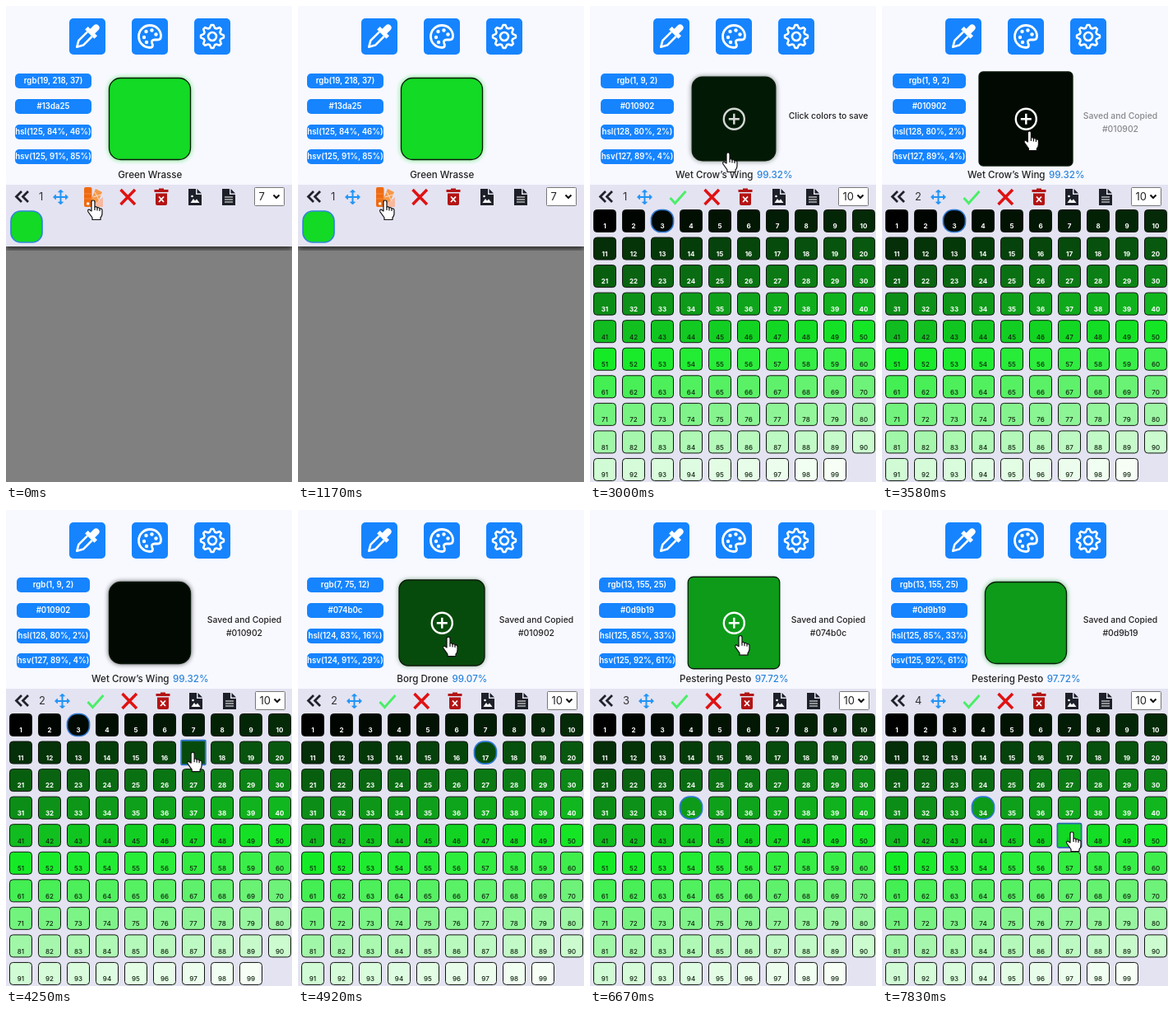
Write an HTML page that moves like this. It is 348 by 578 pixels and loops after 8 s.

```html
<!DOCTYPE html>
<html lang="en">
<head>
<meta charset="utf-8">
<title>Color picker</title>
<style>
html, body { margin: 0; width: 100%; height: 100%; overflow: hidden; background: #f8f9ff; }
svg { display: block; font-family: Inter, "Open Sans", sans-serif; }
</style>
</head>
<body>
<svg id="stage" width="348" height="578" viewBox="0 0 348 578">
  <defs>
    <filter id="soft" x="-20%" y="-20%" width="140%" height="140%"><feGaussianBlur stdDeviation="3"/></filter>
  </defs>
  <rect width="348" height="578" fill="#f8f9ff"/>

  <g fill="#1684ff">
    <rect x="77" y="15" width="44" height="44" rx="5"/>
    <rect x="153" y="15" width="44" height="44" rx="5"/>
    <rect x="229" y="15" width="44" height="44" rx="5"/>
  </g>
  <g transform="translate(99 37) rotate(45)" fill="#fff">
    <path d="M-4-9V-15Q-4-19 0-19T4-15V-9H8V-4H-8V-9Z"/>
    <path d="M-4-4V11L0 18L4 11V-4" fill="none" stroke="#fff" stroke-width="2.6" stroke-linejoin="round"/>
  </g>
  <g transform="translate(175 37)" fill="#fff">
    <path d="M0-13.5A13.5 13.5 0 0 0 0 13.5C4 13.5 4 10.5 2.8 8.5C1.5 5.5 3 4 6 4H9.5C12.5 4 13.5 2 13.5-.5C13.5-8 7.5-13.5 0-13.5Z" fill="none" stroke="#fff" stroke-width="2.8"/>
    <circle cx="-7" cy="1" r="2.2"/><circle cx="-4.5" cy="-6" r="2.2"/>
    <circle cx="2.5" cy="-7.5" r="2.2"/><circle cx="7.5" cy="-2.5" r="2.2"/>
    <circle cx="-4" cy="7" r="2.2"/>
  </g>
  <g transform="translate(251 37)" fill="none" stroke="#fff" stroke-width="2.6" stroke-linejoin="round">
    <path id="gear"/><circle r="5"/>
  </g>

  <g id="pills"></g>

  <rect id="glow" filter="url(#soft)"/>
  <rect id="swatch" stroke="#0c1a0c" stroke-width="1.3"/>
  <g id="plus" transform="translate(175.3 137.3)" fill="none" stroke="#fff" stroke-width="2.4">
    <circle r="12.5"/><path d="M-6.5 0H6.5M0-6.5V6.5"/>
  </g>
  <text id="name" x="175.3" y="209" font-size="11.6" font-weight="500" fill="#222" text-anchor="middle"><tspan></tspan><tspan dx="4.5" fill="#2a84dc"></tspan></text>
  <g id="message" font-size="10.4" font-weight="500" fill="#222" text-anchor="middle">
    <text x="290" y="137"></text><text x="290" y="153"></text>
  </g>

  <g id="saved">
    <rect y="292" width="348" height="286" fill="#808080"/>
    <rect y="287" width="348" height="8" fill="#222" filter="url(#soft)"/>
  </g>
  <rect id="panel" y="217" width="348" fill="#e4e3f2"/>
  <rect id="savedColor" x="6" y="249" width="38" height="38" rx="12" fill="#13da25" stroke="#2f86d8" stroke-width="1.7"/>

  <path d="M19 225L12.5 231.5L19 238M27 225L20.500 231.500L27 238" fill="none" stroke="#20222a" stroke-width="2.8"/>
  <text id="count" x="40" y="236" font-size="13" fill="#333"></text>
  <g id="tools">
    <g transform="translate(66.500 232)" fill="#2094f5" stroke="#2094f5" stroke-width="2">
      <path d="M-7 0H7M0-7V7"/>
      <path d="M0-9L3-6H-3ZM0 9L3 6H-3ZM-9 0L-6-3V3ZM9 0L6-3V3Z" stroke-width=".8"/>
    </g>
    <g id="fan">
      <path d="M103 237L109 222L117 226L110 243Z" fill="#f59a4a"/>
      <path d="M104 243L118 232V244H104Z" fill="#f8b9a0"/>
      <path d="M106 232L116 229M108 226L114 237" stroke="#fde0d0"/>
      <rect x="95" y="220" width="9.500" height="24" rx="2" fill="#ee6b12"/>
      <path d="M95 228H104M95 234H104" stroke="#f58a3c"/>
      <circle cx="99.700" cy="240" r="1.700" fill="#fff"/>
    </g>
    <path id="check" d="M97.500 233L103.500 239.500L116.500 225" fill="none" stroke="#4bee68" stroke-width="3"/>
    <path d="M139.500 223L157 241M157 223L139.500 241" stroke="#e01212" stroke-width="3.500"/>
    <g fill="#b31414">
      <path d="M180.500 223H186V221.500H192V223H197.500V226H180.500ZM182 227.500H196V240Q196 242 194 242H184Q182 242 182 240Z"/>
      <path d="M186 231.500L192 238M192 231.500L186 238" stroke="#fff" stroke-width="1.800"/>
    </g>
  </g>
  <g id="files">
    <g fill="#1d2028">
      <path id="page" d="M222 222H231V229H238V242H222ZM232.500 222L238 227.500H232.500Z"/>
      <use href="#page" x="41"/>
    </g>
    <path d="M224.500 239L228 234L230 236.500L232 234.500L235.500 239Z" fill="#fff"/>
    <circle cx="226.500" cy="231" r="1.300" fill="#fff"/>
    <path d="M266 232H276M266 235H276M266 238H276" stroke="#fff" stroke-width="1.200"/>
    <rect x="302.500" y="220.500" width="36" height="22" rx="1" fill="#fff" stroke="#777"/>
    <text id="perRow" x="307.500" y="236" font-size="13" fill="#222"></text>
    <path d="M325.500 229.500L329 233L332.500 229.500" fill="none" stroke="#111" stroke-width="2"/>
  </g>

  <g id="grid"></g>

  <g id="cursor" stroke="#111" stroke-width="1.200" stroke-linejoin="round">
    <path id="arrow" d="M0 0V16.500L4 13L7 19L10 17.700L7.200 12H12Z" fill="#fff"/>
    <g id="hand">
      <path d="M-2 2Q-2 0 0 0T2 2V8Q4 7 5 9Q7 8 8 10Q11 9.500 11 12V16Q11 19 9 21V23.500H-1V21L-6 14Q-7 11.500-5 11L-2 13Z" fill="#fff"/>
      <path d="M2 8V12M5 9V12.500M8 10V13" fill="none"/>
    </g>
  </g>
</svg>
<script>
const LOOP = 8000, FPS = 12, GRID_AT = 1333;
const BLUE = [47, 120, 210], EDGE = [17, 22, 17];
const $ = id => document.getElementById(id);
const clamp = v => Math.min(1, Math.max(0, v));
const mix = (a, b, k) => a + (b - a) * k;
const blend = (a, b, k) => `rgb(${a.map((v, i) => Math.round(mix(v, b[i], k)))})`;
const easeOut = k => 1 - (1 - clamp(k)) ** 2;
const hex = rgb => '#' + rgb.map(v => v.toString(16).padStart(2, '0')).join('');

function add(parent, tag, attrs, text = '') {
  const el = document.createElementNS('http://www.w3.org/2000/svg', tag);
  set(el, attrs);
  el.textContent = text;
  return parent.appendChild(el);
}
function set(el, attrs) {
  for (const key in attrs) el.setAttribute(key, attrs[key]);
}
const show = (el, on) => { el.style.display = on ? '' : 'none'; };

const picks = [
  { at: 0, rgb: [19, 218, 37], hsl: '125, 84%, 46%', hsv: '125, 91%, 85%', name: 'Green Wrasse', match: '', cell: 0, pill: 93 },
  { at: 2750, rgb: [1, 9, 2], hsl: '128, 80%, 2%', hsv: '127, 89%, 4%', name: 'Wet Crow’s Wing', match: '99.32%', cell: 3, pill: 89 },
  { at: 4480, rgb: [7, 75, 12], hsl: '124, 83%, 16%', hsv: '124, 91%, 29%', name: 'Borg Drone', match: '99.07%', cell: 17, pill: 93 },
  { at: 6050, rgb: [13, 155, 25], hsl: '125, 85%, 33%', hsv: '125, 92%, 61%', name: 'Pestering Pesto', match: '97.72%', cell: 34, pill: 93 }
];
const saves = [3420, 5150, 6980];

// time, x, y of the pointer tip
const path = [
  [0, 106, 236], [1400, 106, 236], [1830, 34, 262], [2150, 62, 272],
  [2450, 86, 267], [2770, 87, 266], [3000, 168, 178], [3250, 179, 152],
  [3820, 180, 152], [4150, 227, 294], [4580, 228, 295], [4920, 183, 154],
  [5420, 183, 152], [5760, 123, 357], [6130, 123, 357], [6480, 183, 153],
  [7250, 183, 151], [7680, 231, 391], [LOOP, 231, 391]
];
function pointer(t) {
  t = Math.max(0, t);
  const i = Math.max(1, path.findIndex(p => p[0] >= t));
  const [a, b] = [path[i - 1], path[i]];
  const k = clamp((t - a[0]) / (b[0] - a[0]));
  const s = k * k * (3 - 2 * k);
  return [mix(a[1], b[1], s), mix(a[2], b[2], s)];
}
const inside = ([px, py], x, y, size) => px >= x && px <= x + size && py >= y && py <= y + size;

// share of the last `span` ms that the pointer spent over a square
function hover(t, x, y, size, span) {
  let hits = 0;
  for (let i = 0; i < 6; i++) hits += inside(pointer(t - span * i / 5), x, y, size);
  return hits / 6;
}

const gear = [];
for (let i = 0; i < 32; i++) {
  const a = (i - 1.5) * Math.PI / 16, r = i % 4 === 1 || i % 4 === 2 ? 14 : 10.7;
  gear.push(`${(r * Math.sin(a)).toFixed(2)} ${(-r * Math.cos(a)).toFixed(2)}`);
}
$('gear').setAttribute('d', `M${gear.join('L')}Z`);

const pills = [82, 113, 144, 174].map(y => ({
  box: add($('pills'), 'rect', { y, height: 18, rx: 5, fill: '#1684ff' }),
  label: add($('pills'), 'text', { x: 57.5, y: y + 12.3, 'font-size': 9.7, 'font-weight': 600, fill: '#fff', 'text-anchor': 'middle' })
}));

const cells = Array.from({ length: 99 }, (_, i) => {
  const x = 4.5 + i % 10 * 35, y = 247.5 + Math.floor(i / 10) * 33.55;
  const g = add($('grid'), 'g', {});
  return {
    x, y, g,
    box: add(g, 'rect', { x, y, width: 27, height: 27, fill: `hsl(125, 84%, ${i}%)` }),
    label: add(g, 'text', { x: x + 13.5, y: y + 22.8, 'font-size': 8, 'font-weight': i < 40 ? 700 : 500, fill: i < 40 ? '#fff' : '#10240f', 'text-anchor': 'middle' }, i + 1)
  };
});

function drawCells(t, pick) {
  cells.forEach((c, i) => {
    const h = hover(t, c.x, c.y, 27, 130);
    const chosen = i + 1 === pick.cell ? easeOut((t - pick.at) / 300) : 0;
    const lift = h * (1 - chosen);
    const scale = 1 + .1 * lift, cx = c.x + 13.5, cy = c.y + 13.5;
    set(c.g, { transform: `translate(${cx} ${cy}) scale(${scale}) translate(${-cx} ${-cy})` });
    set(c.box, {
      rx: mix(mix(4, 1, lift), 12, chosen),
      stroke: blend(EDGE, BLUE, Math.max(lift, chosen)),
      'stroke-width': 1 + .7 * Math.max(lift, chosen)
    });
    c.label.style.opacity = 1 - lift;
  });
}

function drawSwatch(t, pick, previous) {
  const fill = blend(previous.rgb, pick.rgb, easeOut((t - pick.at) / 350));
  const h = hover(t, 125, 87, 100, 300);
  const half = mix(49.5, 57, h);
  const box = { x: 175 - half, y: 137 - half, width: half * 2, height: half * 2, rx: mix(14, 5, h), fill };
  set($('swatch'), box);
  set($('glow'), { ...box, opacity: .8 * (1 - h) });
  $('plus').style.opacity = hover(t, 125, 87, 100, 50);
}

function drawTexts(t, pick, saveCount) {
  const [r, g, b] = pick.rgb;
  const values = [`rgb(${r}, ${g}, ${b})`, hex(pick.rgb), `hsl(${pick.hsl})`, `hsv(${pick.hsv})`];
  pills.forEach((p, i) => {
    p.label.textContent = values[i];
    set(p.box, { x: 57.5 - pick.pill / 2, width: pick.pill });
  });
  const [name, match] = $('name').children;
  name.textContent = pick.name;
  match.textContent = pick.match;

  const savedAt = saves[saveCount - 1];
  const saved = picks[saveCount];
  const [first, second] = $('message').children;
  first.textContent = saveCount ? 'Saved and Copied' : 'Click colors to save';
  second.textContent = saveCount ? hex(saved.rgb) : '';
  $('message').style.opacity = saveCount ? clamp((t - savedAt) / 250 + .2) : clamp((t - 1780) / 600);
}

function draw(t) {
  const index = picks.findLastIndex(p => t >= p.at);
  const pick = picks[index];
  const saveCount = saves.filter(s => t >= s).length;
  const open = t >= GRID_AT;

  drawTexts(t, pick, saveCount);
  drawSwatch(t, pick, picks[Math.max(0, index - 1)]);

  set($('panel'), { height: open ? 361 : 75 });
  for (const id of ['saved', 'savedColor', 'fan']) show($(id), !open);
  for (const id of ['grid', 'check']) show($(id), open);
  if (open) drawCells(t, pick);
  $('perRow').textContent = open ? 10 : 7;
  $('count').textContent = saveCount + 1;
  set($('tools'), { transform: `translate(${saveCount ? 2 : 0} 0)` });
  set($('files'), { transform: `translate(${saveCount ? 1 : 0} 0)` });

  const tip = pointer(t);
  const active = !open || inside(tip, 125, 87, 100) || cells.some(c => inside(tip, c.x, c.y, 27))
    || (tip[1] > 220 && tip[1] < 244);
  show($('hand'), active);
  show($('arrow'), !active);
  set($('cursor'), { transform: `translate(${tip})` });
}

const start = performance.now();
let last = -1;
function tick() {
  const frame = Math.floor((performance.now() - start) % LOOP * FPS / 1000);
  if (frame !== last) draw((last = frame) * 1000 / FPS);
  requestAnimationFrame(tick);
}
tick();
</script>
</body>
</html>
```
